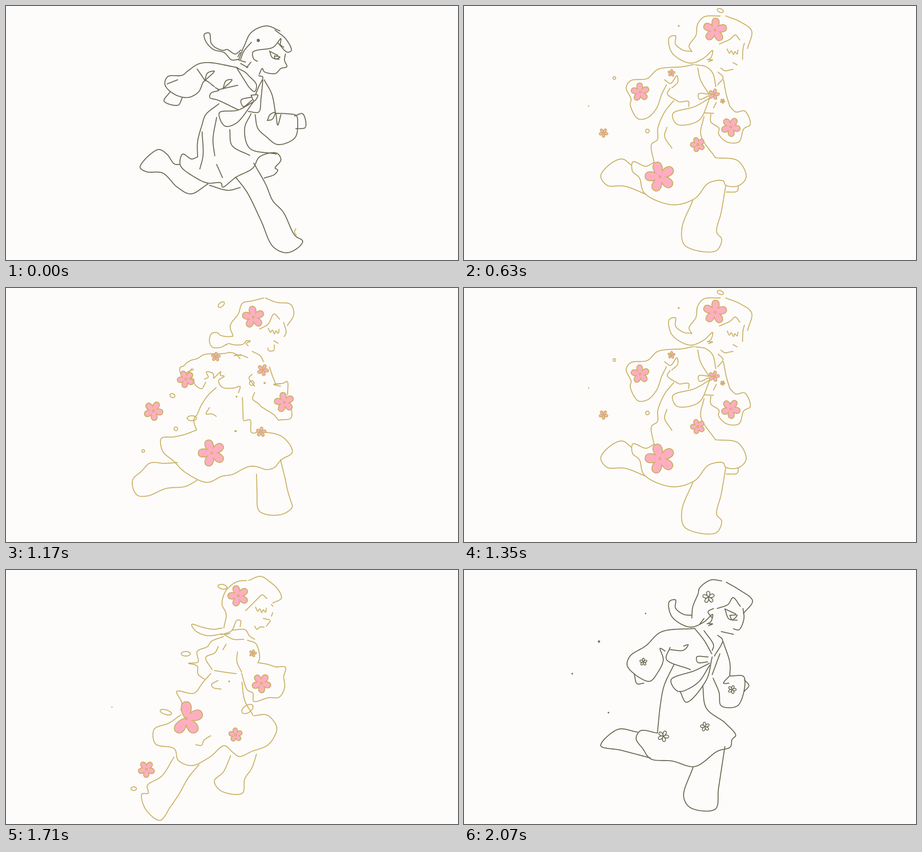
Recreate the animation shown at these times as an HTML page with a canvas. Size 998 px wide and 561 px high, loop 2160 ms.

```html
<!DOCTYPE html>
<html lang="en">
<head>
<meta charset="utf-8">
<title>Running in bloom</title>
<style>
html, body { margin: 0; width: 100%; height: 100%; overflow: hidden; background: #fdfcfb; }
canvas { display: block; }
</style>
</head>
<body>
<canvas id="stage" width="998" height="561"></canvas>
<script>
const ctx = document.getElementById('stage').getContext('2d');
const PAPER = [253, 252, 251], INK = [110, 106, 82], GOLD = [202, 178, 102], PINK = [255, 174, 192];
const STEP = 90, FRAMES = 24, SAMPLES = 140;

const lerp = (a, b, u) => a + (b - a) * u;
const mix = (a, b, u) => a.map((v, i) => lerp(v, b[i], u));
const rgb = c => `rgb(${c.map(Math.round)})`;

// Smooth curve through a few points, sampled so that any two strokes can blend.
function curve(pts) {
  const knots = [0], last = pts.length - 1;
  for (let i = 0; i < last; i++)
    knots.push(knots[i] + Math.sqrt(Math.hypot(pts[i + 1][0] - pts[i][0], pts[i + 1][1] - pts[i][1])));
  const speed = (i, k) => (pts[i + 1][k] - pts[i][k]) / (knots[i + 1] - knots[i]);
  const slope = (i, k) => {
    if (i === 0) return speed(0, k);
    if (i === last) return speed(last - 1, k);
    const u = (knots[i] - knots[i - 1]) / (knots[i + 1] - knots[i - 1]);
    return lerp(speed(i - 1, k), speed(i, k), u);
  };
  return Array.from({ length: SAMPLES + 1 }, (_, n) => {
    const s = n / SAMPLES * knots[last];
    let i = 0;
    while (i < last - 1 && knots[i + 1] < s) i++;
    const h = knots[i + 1] - knots[i], t = (s - knots[i]) / h, ease = t * t * (3 - 2 * t);
    return [0, 1].map(k => lerp(pts[i][k], pts[i + 1][k], ease)
      + h * t * (1 - t) * (slope(i, k) * (1 - t) - slope(i + 1, k) * t));
  });
}

const strokes = text => text.split('/').map(s => curve(s.split(' ').map(p => p.split(',').map(Number))));

const ring = (x, y, rx, ry = rx, tilt = 0) => Array.from({ length: SAMPLES + 1 }, (_, n) => {
  const a = n / SAMPLES * 2 * Math.PI, c = rx * Math.cos(a), s = ry * Math.sin(a);
  return [x + c * Math.cos(tilt) - s * Math.sin(tilt), y + c * Math.sin(tilt) + s * Math.cos(tilt)];
});

const lashes = (x, y) => strokes('0,0 5,9 9,4 14,12 17,6 22,11 24,2').map(l => l.map(p => [p[0] + x, p[1] + y]));

// Flowers are [x, y, radius, first petal angle, petals].
const contact = {};
contact.hair = strokes('514,118 526,88 542,58 575,44 605,55/594,53 618,73 630,98 621,102 601,82/558,97 590,91 607,72 606,85 613,91/542,80 525,100 518,118');
contact.face = strokes('617,106 615,120 620,134 607,138 595,149 570,145 566,138 559,151/556,97 545,102 547,117 555,122/541,124 531,136');
contact.eye = strokes('582,99 588,114 603,118/584,101 600,109/593,110 605,113 594,117 593,110');
contact.plait = strokes('512,118 498,119 482,103 458,96 441,78 438,62 449,60 453,82 463,92 480,98 488,96 506,106 519,97/513,119 529,124/512,112 517,103');
contact.collar = strokes('509,136 524,160 539,182 549,189 553,174 536,154 529,147 509,136/518,127 534,136/558,154 567,157 558,178 551,196');
contact.bow = strokes('543,201 519,208 524,222 543,208/547,211 512,230 471,236 483,265 508,259 547,211/541,197 556,197 548,210 541,197');
contact.armL = strokes('511,136 448,125 425,128 402,143 389,153 357,156 351,174 372,195 402,202 425,190 439,165 460,178/462,180 470,186 453,192 450,202 468,208 512,229/362,190 349,210 380,219 389,203/439,165 445,148 460,144 439,165/422,139 439,164/479,183 486,165 499,163 479,183/468,185 512,175/356,172 379,163');
contact.armR = strokes('570,163 587,195 595,236/595,237 620,238 641,242 644,256 638,291 600,306 575,289 556,270 550,240/637,243 655,238 661,268 640,271/577,253 583,240 594,235 588,250 577,253/596,237 600,263 607,240/567,164 563,205 558,234 535,233');
contact.skirt = strokes('470,216 441,240 433,262 423,300 423,333/423,333 410,338 390,327 385,352 420,380 445,391 475,391 478,400 508,378 545,358 560,333 598,325 607,340 594,358 600,362 593,372 570,380/541,238 527,270 538,314 597,327/494,273 499,308 538,330/465,246 457,295 461,331/433,278 435,330 428,360/465,350 478,379/449,396 490,407 517,401');
contact.legF = strokes('507,378 532,411 563,474 590,532 620,545 647,532 655,519 638,507 612,455 589,430 574,395 547,347');
contact.legB = strokes('384,350 372,349 355,327 336,317 296,356 310,366 346,369 378,400 408,415 446,393');
contact.flowers = [[557, 76, 22, -95], [380, 175, 17, -100], [618, 268, 18, -110], [450, 350, 28, -108], [550, 345, 12, -100]];

const start = { ...contact, spark: strokes('640,492 637,499 641,507'), flowers: [[557, 76, 3, 0]] };

const pushOff = {};
pushOff.hair = strokes('481,128 486,97 477,75 486,45 510,26 531,23/536,23 562,14 585,28 600,42 608,62 589,73/529,90 553,66 566,55 576,63');
pushOff.face = strokes('586,76 589,80/549,124 554,131 561,126 570,126/589,94 586,102/568,107 582,110/584,112 575,124');
pushOff.eye = lashes(551, 82);
pushOff.plait = strokes('477,141 445,145 418,134 410,120 432,126 458,131 477,128/475,143 498,134 510,111 518,112 517,125');
pushOff.collar = strokes('482,143 502,153 525,153/482,143 495,140/499,133 528,132 538,146 549,153');
pushOff.armL = strokes('480,147 453,158 445,169 422,180 424,203 403,206 422,212 424,230 438,241/469,169 461,183 441,193 455,220/460,222 485,226 508,229/486,164 479,176');
pushOff.armR = strokes('533,155 552,163 560,195 556,205/613,237 615,260 603,281 580,282 547,290 545,272 533,265 520,228/597,214 617,215 613,235/511,181 510,203 520,225/558,205 576,208 598,215');
pushOff.skirt = strokes('452,229 435,248 415,272 377,268 388,293 386,310/386,320 360,338 327,352 330,384 372,395 380,420 410,432 450,413 482,388 500,402 515,412 542,401 580,385 598,352 592,335 575,320 547,322/521,248 527,288 545,320/419,386 432,387 437,376 452,366/475,263 458,260 454,253 468,244');
pushOff.legB = strokes('371,413 344,455 312,476 314,493 300,495 308,528 340,553 363,523 382,495 403,458 426,430');
pushOff.legF = strokes('496,410 480,446 460,466 475,488 522,493 527,462 543,437 553,407');
pushOff.drift = [ring(478, 37, 10, 5, .2), ring(397, 185, 10, 5), ring(282, 483, 6, 4), ring(533, 307, 14, 8, -.6), ring(353, 314, 13, 5, .3), ring(493, 246, 1), ring(234, 303, .5)];
pushOff.flowers = [[513, 57, 22, -108], null, [564, 250, 20, -128], [398, 328, 36, -90, 4], [507, 364, 14, -95], [545, 184, 8, -75], null, [310, 440, 17, -125]];

const leap = {};
leap.hair = strokes('500,107 494,80 514,54 524,33 545,32 570,22/570,22 595,32 628,31 635,57 619,77/558,94 575,83 588,54 602,66');
leap.face = strokes('610,73 620,96 614,102/605,120 600,134 576,137 570,129/590,112 600,118');
leap.eye = lashes(578, 86);
leap.plait = strokes('500,110 472,115 449,116 435,134 451,140 464,125/466,124 485,129 510,127 523,115 536,116 524,123 532,130');
leap.collar = strokes('520,152 495,145 515,134 530,133/476,149 497,145/535,137 556,145 573,157');
leap.armL = strokes('475,152 437,151 424,159 387,153 381,168 398,183/395,185 374,203 388,222 389,240 411,249 432,222/430,211 445,200 438,178 453,180 450,192/450,193 470,172 467,184 478,187 457,202 468,223 505,224 527,217 522,236');
leap.armR = strokes('586,180 600,208/651,264 637,269 630,300 600,298 589,265 560,250 544,240 551,227/610,213 640,207 655,200 657,242/550,168 535,180 548,207/606,211 591,213 606,217');
leap.skirt = strokes('464,226 440,245 415,282 421,298/421,298 382,312 365,322 328,317 326,352 360,371 380,395 430,425 460,411 490,415 530,398 570,404 588,398 604,374 638,358 612,321 565,307/518,241 523,283 526,298 545,289 542,320 562,309/450,262 441,275 458,267 467,268');
leap.legB = strokes('383,402 345,411 308,410 288,432 267,452 280,492 310,490 355,466 405,455 432,429');
leap.legF = strokes('577,402 590,432 595,475 625,481 665,468 645,418 620,371');
leap.drift = [ring(430, 50, 11, 6, -1), ring(385, 277, 7, 5, .5), ring(252, 402, 2.5), ring(577, 293, 7), ring(478, 321, 15, 8), ring(375, 311, 4), ring(509, 240, 1), ring(507, 316, 2, 1)];
leap.flowers = [[542, 70, 22, -102], [401, 207, 17, -125], [627, 245, 21, -122], [465, 358, 27, -110], [587, 324, 9, -70], [575, 174, 13, -60], [466, 154, 11, -85], [334, 267, 25, -65]];

const support = {};
support.hair = strokes('503,101 497,88 512,65 516,40 530,24 566,22/578,22 610,35 635,55 626,94/564,84 588,73 599,64 609,75');
support.face = strokes('619,82 616,95 615,118/567,137 576,143 588,141 594,140/594,125 603,130');
support.eye = lashes(581, 95);
support.plait = strokes('503,100 485,98 467,84 467,66 453,70 459,103 498,126 528,116 549,98 545,114 537,119/541,119 549,119 540,123');
support.collar = strokes('516,137 522,163 541,195/511,130 534,134 549,148 556,178/561,146 572,158 560,174');
support.bow = strokes('543,195 518,194 520,206 541,198/543,203 510,222 461,238 470,261 518,253 543,203');
support.armL = strokes('508,129 483,134 428,140 405,160 368,165 358,180 369,206 367,218 384,249 405,247 425,226 437,194 447,174/443,163 456,171 470,154 472,168 459,181/455,182 449,194 475,212/477,212 496,211 496,222');
support.armR = strokes('573,163 579,195 587,222/587,222 600,234 620,232 632,262 618,271 607,300 580,300 562,282 563,270 545,256 545,239/557,213 551,225/531,236 551,237');
support.skirt = strokes('463,209 443,234 428,270 427,295 414,306 420,347/418,346 402,354 373,344 372,365 387,379 398,413 460,439 510,425 540,391 572,386 578,396 606,397 623,378 605,342 555,335/530,244 523,285 555,335/448,268 443,288 459,314/579,411 603,409 606,397');
support.legF = strokes('505,430 481,492 488,529 556,541 569,515 558,500 568,455 578,396');
support.legB = strokes('370,352 350,338 327,346 302,375 316,396 355,398 402,416');
support.drift = [ring(566, 10, 7, 4, .4), ring(332, 159, 3), ring(405, 276, 4), ring(474, 44, 1), ring(275, 221, .5)];
support.flowers = [[554, 53, 25, -85], [389, 190, 19, -95], [589, 267, 20, -58], [433, 377, 32, -105], [516, 306, 15, -110], [552, 195, 12, -75], [458, 148, 8, -85], [308, 280, 10, -55], [571, 210, 5, -60]];

const rest = { plait: support.plait };
rest.hair = strokes('503,106 505,82 517,52 520,40 545,22 569,24/579,27 605,42 637,68 617,96/559,85 583,76 594,61 610,80');
rest.face = strokes('616,85 618,108 607,132 595,130/595,142 568,136/551,85 539,92 547,105/530,107 521,119');
rest.eye = strokes('576,86 585,108 603,111/576,86 600,97/587,100 603,100 592,110 587,100');
rest.collar = strokes('510,130 530,155 547,185/530,134 551,166 548,178/560,144 571,155 553,190');
rest.bow = strokes('539,192 514,192 516,204 538,203/542,206 510,222 457,243 473,268 515,250 543,210/477,268 491,292 535,243 548,192/565,185 548,231');
rest.armL = strokes('510,129 435,137 402,167 366,191 361,213 409,246 428,226 440,198 433,173 444,179/455,171 447,197 500,220/376,231 382,251 397,250/455,176 485,177 495,165 485,168');
rest.armR = strokes('572,158 587,205 587,233/588,234 618,236 605,299 568,300 563,270 550,239/619,243 629,255 618,269/587,233 573,250 585,250');
rest.skirt = strokes('464,208 442,255 434,295 427,360/426,360 390,355 380,372 395,395 412,417 460,422 510,434 560,400 588,391 592,374 600,365 575,336/527,255 535,305 575,336');
rest.legF = strokes('506,435 485,500 500,525 555,528 562,482 576,390');
rest.legB = strokes('383,358 340,352 302,388 346,398 411,415');
rest.drift = [ring(401, 96, .5), ring(298, 158, 1.5), ring(239, 229, .7), ring(319, 315, .7)];
rest.flowers = [[540, 60, 13, -95], [396, 203, 8, -90], [592, 264, 9, -70], [440, 367, 12, -65], [532, 346, 10, -100]];

// [frame, pose, bloom]
const keys = [[0, start, 0]];
for (const f of [0, 8, 16]) {
  if (f) keys.push([f, contact, 1]);
  keys.push([f + 3, pushOff, 1], [f + 4, leap, 1], f < 16 ? [f + 7, support, 1] : [23, rest, 0]);
}

function drawStrokes(a = [], b = [], u, color) {
  ctx.strokeStyle = color;
  ctx.lineWidth = 2.1;
  for (let i = 0; i < Math.max(a.length, b.length); i++) {
    const line = a[i] && b[i] ? a[i].map((p, n) => mix(p, b[i][n], u)) : u < .5 ? a[i] : b[i];
    if (!line) continue;
    ctx.beginPath();
    line.forEach(p => ctx.lineTo(...p));
    ctx.stroke();
  }
}

function drawFlower([x, y, r, angle, count = 5], line, fill) {
  if (r < 1) return;
  const petals = new Path2D(), small = r < 14;
  for (let i = 0; i < count; i++) {
    const a = angle * Math.PI / 180 + i * Math.PI * .4, c = Math.cos(a) * r, s = Math.sin(a) * r;
    const at = (u, v) => [x + u * c - v * s, y + u * s + v * c];
    petals.moveTo(x, y);
    petals.bezierCurveTo(...at(.3, -.32), ...at(1, -.42), ...at(1, 0));
    petals.bezierCurveTo(...at(1, .42), ...at(.3, .32), x, y);
  }
  ctx.fillStyle = fill;
  ctx.strokeStyle = line;
  ctx.lineWidth = small ? 1.8 : 4.4;
  if (small) ctx.fill(petals);
  ctx.stroke(petals);
  if (small) return;
  ctx.fill(petals);
  ctx.lineWidth = 1.8;
  ctx.beginPath();
  ctx.arc(x, y, 2.2, 0, 7);
  ctx.stroke();
}

function draw(frame) {
  const i = keys.findLastIndex(k => k[0] <= frame);
  const [f0, a, bloom0] = keys[i], [f1, b, bloom1] = keys[i + 1] || keys[i];
  const u = f1 > f0 ? (frame - f0) / (f1 - f0) : 0;
  const bloom = lerp(bloom0, bloom1, u);
  const line = rgb(mix(INK, GOLD, bloom)), fill = rgb(mix(PAPER, PINK, bloom));
  // The planted leg falls behind while the other swings forward.
  const swap = b === pushOff ? { legF: 'legB', legB: 'legF' } : {};

  ctx.fillStyle = rgb(PAPER);
  ctx.fillRect(0, 0, 998, 561);
  ctx.lineCap = ctx.lineJoin = 'round';
  for (const part in { ...a, ...b })
    if (part !== 'flowers')
      drawStrokes(a[part], b[swap[part] || part], u, part === 'spark' ? rgb(GOLD) : line);

  for (let n = 0; n < 9; n++) {
    const p = a.flowers[n], q = b.flowers[n];
    if (!p && !q) continue;
    const bud = ([x, y, , angle]) => [x, y, 0, angle];
    const from = p || bud(q), to = q || bud(p);
    drawFlower([...mix(from.slice(0, 4), to, u), (u < .5 ? from : to)[4]], line, fill);
  }
}

let shown = -1;
const begin = performance.now();
function tick() {
  const frame = Math.floor((performance.now() - begin) / STEP) % FRAMES;
  if (frame !== shown) draw(shown = frame);
  requestAnimationFrame(tick);
}
tick();
</script>
</body>
</html>
```
